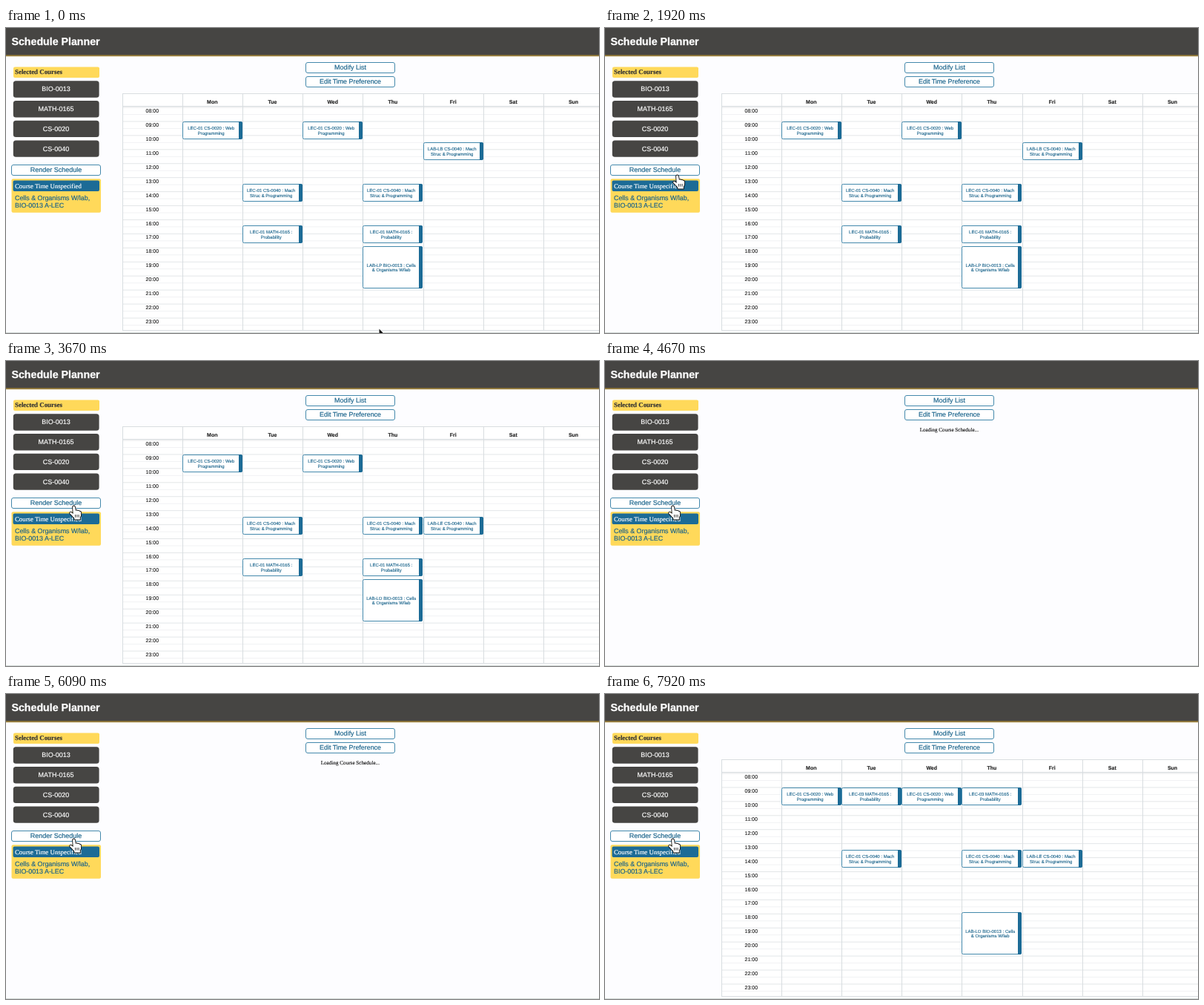
Recreate the animation shown at these times as an HTML page with a canvas. Size 800 by 411 pixels, loop 8 s.

```html
<!DOCTYPE html>
<html lang="en">
<head>
<meta charset="utf-8">
<title>Schedule Planner</title>
<style>
html, body { margin: 0; width: 100%; height: 100%; overflow: hidden; background: #fdfdff; }
canvas { display: block; width: 800px; height: 411px; }
</style>
</head>
<body>
<canvas id="stage"></canvas>
<script>
const W = 800, H = 411, LOOP = 8000;
const SANS = '"Liberation Sans", Arial, sans-serif';
const SERIF = '"Liberation Serif", Times, serif';
const BLUE = '#1c6b96', EDGE = '#4489ac', INK = '#17628a';
const DARK = '#464543', YELLOW = '#ffd95a', PAPER = '#fdfdff';
const GRID = { x: 157, y: 88, body: 107, end: 408, col: 81.2, hour: 18.93 };
const DAYS = ['Mon', 'Tue', 'Wed', 'Thu', 'Fri', 'Sat', 'Sun'];

const canvas = document.getElementById('stage');
const ctx = canvas.getContext('2d');
const dpr = window.devicePixelRatio || 1;
canvas.width = W * dpr;
canvas.height = H * dpr;

// Top and height of each time slot
const SLOT = {
  morning: [126.5, 23], late: [154.5, 23], noon: [210.5, 23],
  afternoon: [266.5, 23], evening: [294.5, 56]
};
const course = (day, slot, ...lines) => ({ day, slot: SLOT[slot], lines });
const web = day => course(day, 'morning', 'LEC-01 CS-0020 : Web', 'Programming');
const mach = (day, slot, section) =>
  course(day, slot, section + ' CS-0040 : Mach', 'Struc & Programming');
const prob = (day, slot, section) =>
  course(day, slot, section + ' MATH-0165 :', 'Probability');
const cells = section =>
  course(3, 'evening', section + ' BIO-0013 : Cells', '& Organisms W/lab');

const common = [web(0), web(2), mach(1, 'noon', 'LEC-01'), mach(3, 'noon', 'LEC-01')];
const math = (slot, section) => [prob(1, slot, section), prob(3, slot, section)];
const plans = [
  [...common, ...math('afternoon', 'LEC-01'), mach(4, 'late', 'LAB-LB'), cells('LAB-LP')],
  [...common, ...math('afternoon', 'LEC-01'), mach(4, 'noon', 'LAB-LE'), cells('LAB-LO')],
  [...common, ...math('morning', 'LEC-03'), mach(4, 'noon', 'LAB-LE'), cells('LAB-LO')]
];

// Each entry starts a view; null means loading
const views = [
  [0, 0], [2330, null], [2750, 1], [4420, null], [4920, 1],
  [5920, null], [6420, 2], [6750, null], [7250, 2]
];

// Cursor stops: time, x, y
const path = [
  [0, 503.5, 405.5], [170, 503.5, 405.5], [1090, 97.5, 198.5],
  [2090, 97.5, 198.5], [2300, 91.5, 195.5], [LOOP, 91.5, 195.5]
];

// A hairline stroke gives the slightly heavier smoothed glyphs
function text(str, x, y, size, color, { font = SANS, bold = false, align = 'left' } = {}) {
  ctx.font = `${bold ? 'bold ' : ''}${size}px ${font}`;
  ctx.textAlign = align;
  ctx.fillStyle = ctx.strokeStyle = color;
  ctx.lineWidth = size * 0.02;
  ctx.fillText(str, x, y);
  ctx.strokeText(str, x, y);
}

function box(x, y, w, h, r, fill, stroke) {
  ctx.beginPath();
  ctx.roundRect(x, y, w, h, r);
  if (fill) { ctx.fillStyle = fill; ctx.fill(); }
  if (stroke) { ctx.strokeStyle = stroke; ctx.lineWidth = 1; ctx.stroke(); }
}

function rect(x, y, w, h, color) {
  ctx.fillStyle = color;
  ctx.fillRect(x, y, w, h);
}

function button(label, x, y, size) {
  box(x, y, 120, 14, 2.5, '#fff', EDGE);
  text(label, x + 60, y + 9.6, size, INK, { align: 'center' });
}

function drawPage() {
  rect(0, 0, W, H, PAPER);
  rect(0, 0, W, 36, DARK);
  rect(0, 36, W, 1, '#7a6738');
  rect(0, 37, W, 1, '#9c8140');
  rect(0, 38, W, 1, '#e8e0cc');
  text('Schedule Planner', 7.5, 23, 14.2, '#fff', { bold: true });

  box(10, 52.5, 116, 14.5, 2, YELLOW);
  text('Selected Courses', 12, 62.3, 8.9, '#333', { font: SERIF, bold: true });
  ['BIO-0013', 'MATH-0165', 'CS-0020', 'CS-0040'].forEach((name, i) => {
    const y = 71.3 + i * 26.7;
    box(9.8, y, 115.8, 22.4, 3.5, DARK);
    text(name, 67.5, y + 14.1, 9, '#fff', { align: 'center' });
  });

  button('Render Schedule', 7.5, 184.5, 9);
  box(7.5, 203.3, 120.5, 45.5, 2, YELLOW);
  box(9.5, 205.5, 116.5, 14.5, 2, BLUE);
  text('Course Time Unspecified', 12, 215.5, 8.8, '#fff', { font: SERIF });
  text('Cells & Organisms W/lab,', 12, 232.3, 8.9, INK);
  text('BIO-0013 A-LEC', 12, 242.3, 8.9, INK);

  button('Modify List', 404.5, 46.5, 9);
  button('Edit Time Preference', 404.5, 65.5, 8.9);
  rect(0, 410, W, 1, '#d3dad8');
}

function drawEvent({ day, slot: [y, h], lines }) {
  const x = Math.floor(GRID.x + GRID.col * (day + 1)) + 0.5;
  box(x, y, 80, h, 1.8, '#fff', EDGE);
  box(x + 75.5, y - 0.5, 5, h + 1, [0, 2, 2, 0], BLUE);
  lines.forEach((line, i) =>
    text(line, x + 38.2, y + h / 2 - 0.8 + i * 6.6, 6, INK, { align: 'center' }));
}

function drawTable(plan) {
  const { x, y, body, end, col, hour } = GRID;
  rect(x, y, W - x, end - y, '#fff');
  for (let i = 0; i < 32; i++) {
    rect(x, body + i * hour / 2 - 0.5, W - x, 1, i % 2 ? '#f1f2f4' : '#e3e6e8');
  }
  rect(x, y, W - x, 1, '#d9dde0');
  rect(x, 105, W - x, 1, '#d9dde0');
  rect(x, end - 1, W - x, 1, '#d9dde0');
  for (let i = 0; i < 8; i++) rect(Math.floor(x + i * col), y, 1, end - y, '#d8dde0');

  DAYS.forEach((day, i) =>
    text(day, x + (i + 1.5) * col - 0.5, 102, 7, '#222', { bold: true, align: 'center' }));
  for (let i = 0; i < 16; i++) {
    const label = String(i + 8).padStart(2, '0') + ':00';
    text(label, 197.3, body + 7.1 + i * hour, 7, '#222', { align: 'center' });
  }
  plan.forEach(drawEvent);
}

function shape(d, fill, stroke, width) {
  const p = new Path2D(d);
  ctx.lineJoin = 'round';
  ctx.lineWidth = width;
  ctx.fillStyle = fill;
  ctx.strokeStyle = stroke;
  ctx.stroke(p);
  ctx.fill(p);
}

function drawHand() {
  shape('M-1.5 1 Q0 -1 1.5 1 L2.4 6.3 Q4 5 5 6.6 Q6.7 5.6 7.6 7.3 Q9.5 6.8 9.7 9' +
        ' L9.5 13 L8.3 15.5 L8.4 18 L1 18 L0.6 16 L-3 12.3 L-5.4 9.7' +
        ' Q-5.5 7.7 -3.4 8.5 L-0.8 10.5 Z', '#fff', '#111', 1.8);
  ctx.lineWidth = 0.8;
  ctx.beginPath();
  for (const x of [2, 4.3, 6.6]) {
    ctx.moveTo(x, 11.5);
    ctx.lineTo(x + 0.1, 15.2);
  }
  ctx.stroke();
}

function drawArrow() {
  shape('M0 0 L0 10.5 L2.4 8.3 L4 12 L5.8 11.2 L4.2 7.7 L7.3 7.5 Z', '#111', '#fff', 1.4);
}

function cursorAt(t) {
  const i = Math.max(1, path.findIndex(p => p[0] > t));
  const [t0, x0, y0] = path[i - 1], [t1, x1, y1] = path[i];
  const u = (t - t0) / (t1 - t0);
  const k = u * u * (3 - 2 * u);
  return [x0 + (x1 - x0) * k, y0 + (y1 - y0) * k];
}

function drawCursor(t) {
  const [x, y] = cursorAt(t);
  const onButton = x > 8 && x < 128 && y > 184 && y < 199;
  ctx.save();
  ctx.translate(x, y);
  if (onButton) drawHand(); else drawArrow();
  ctx.restore();
}

function draw(t) {
  ctx.setTransform(dpr, 0, 0, dpr, 0, 0);
  ctx.textRendering = 'geometricPrecision';
  ctx.lineJoin = 'round';
  drawPage();
  const view = views.filter(v => v[0] <= t).pop()[1];
  if (view === null) {
    text('Loading Course Schedule...', 464.3, 94.8, 7.17, '#111', { font: SERIF, align: 'center' });
  } else {
    drawTable(plans[view]);
  }
  drawCursor(t);
}

const start = performance.now();
function tick() {
  draw((performance.now() - start) % LOOP);
  requestAnimationFrame(tick);
}
tick();
</script>
</body>
</html>
```
